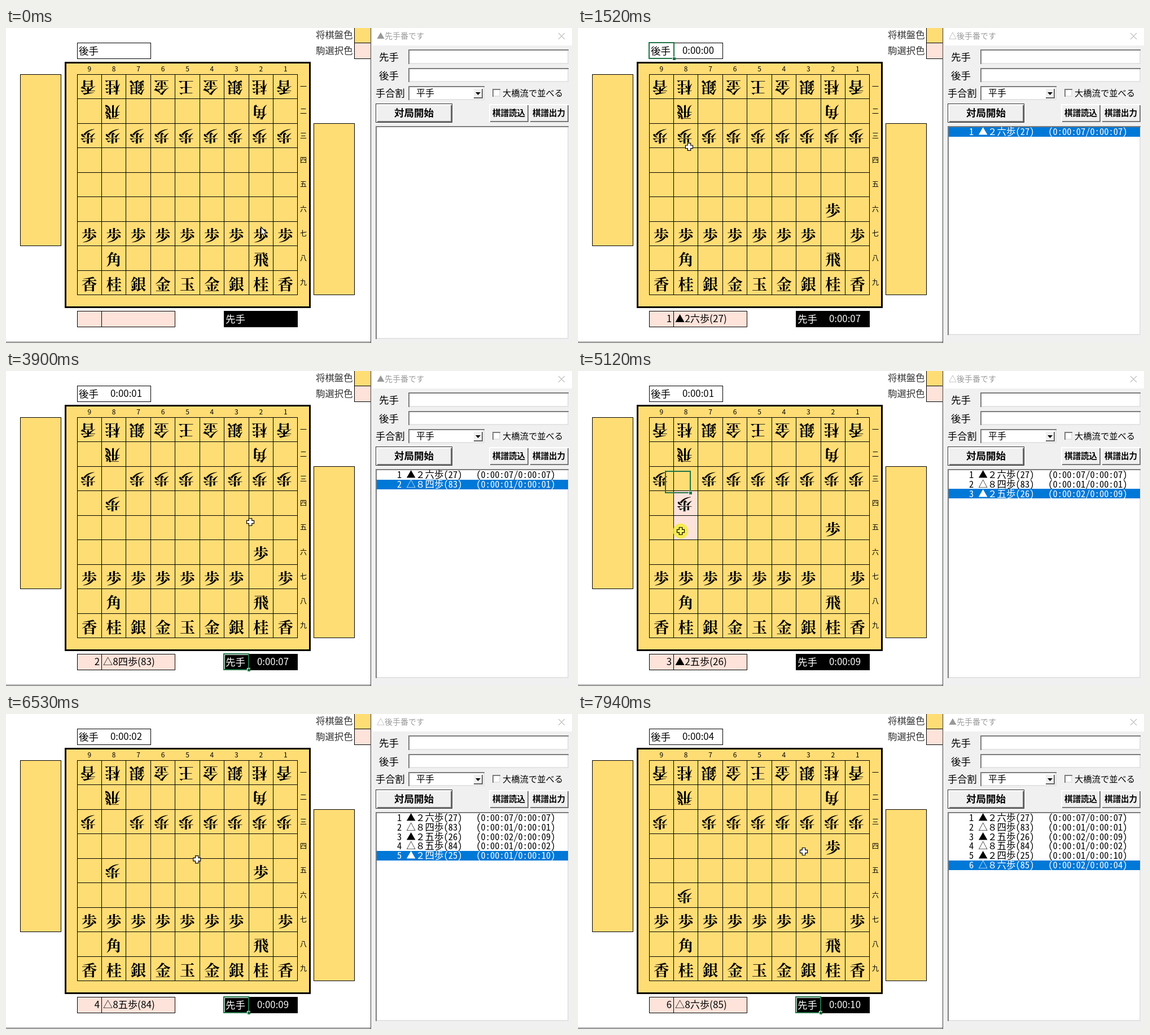
Animation, 1003 px wide and 559 px high, one loop 7.99 s. Source, as an HTML page with a canvas:

```html
<!DOCTYPE html>
<html lang="ja">
<head>
<meta charset="utf-8">
<title>将棋盤</title>
<style>
  html, body { margin: 0; width: 100%; height: 100%; overflow: hidden; background: #fff; }
  canvas { display: block; }
</style>
</head>
<body>
<canvas id="stage" width="1003" height="559"></canvas>
<script>
const ctx = document.getElementById('stage').getContext('2d');
const LOOP = 7990;
const GOLD = '#ffdd75', PINK = '#fde3da', GREEN = '#217346', BLUE = '#0078d7';
const SANS = '"Noto Sans CJK JP", "Noto Sans CJK", sans-serif';
const BRUSH = '"Noto Serif CJK JP", "Noto Sans CJK JP", "Noto Sans CJK", serif';
const MONO = '"Noto Sans Mono CJK JP", "Noto Sans CJK JP", monospace';
const RANKS = '一二三四五六七八九';
const LEFT = 126, TOP = 82.5, CELL = 43.44;
const HOMES = [[386, 502, 44, 28], [126, 26, 44, 28]];   // turn cells: first, second player

// Pawn moves: pick = click on the pawn, drop = click on its goal,
// listAt / boardAt = when the record and the sheet are refreshed.
const MOVES = [
  { file: 2, from: 7, to: 6, spent: 7, total: 7, pick: 60, drop: 500, listAt: 930, boardAt: 1040 },
  { file: 8, from: 3, to: 4, spent: 1, total: 1, pick: 1600, drop: 2290, listAt: 2480, boardAt: 2580 },
  { file: 2, from: 6, to: 5, spent: 2, total: 9, pick: 3050, drop: 3600, listAt: 4040, boardAt: 4150 },
  { file: 8, from: 4, to: 5, spent: 1, total: 2, pick: 4520, drop: 5055, listAt: 5235, boardAt: 5330 },
  { file: 2, from: 5, to: 4, spent: 1, total: 10, pick: 5600, drop: 6050, listAt: 6490, boardAt: 6600 },
  { file: 8, from: 5, to: 6, spent: 2, total: 4, pick: 6850, drop: 7360, listAt: 7540, boardAt: 7640 },
];
const SELECT = 100, STAY = 180, RETURN = 280;

// Pointer path: time, x, y
const PATH = [
  [0, 455, 362], [60, 455, 362], [250, 452, 320], [960, 452, 320], [1280, 296, 266],
  [1520, 197, 211], [1700, 190, 205], [1950, 188, 242], [2500, 188, 242],
  [2940, 435, 320], [3200, 435, 320], [3500, 433, 268], [3960, 433, 268],
  [4400, 187, 240], [4750, 187, 240], [5000, 182, 284], [5140, 182, 284],
  [5360, 400, 276], [5450, 435, 275], [5720, 435, 275], [5950, 436, 240],
  [6320, 436, 240], [6530, 339, 258], [6750, 186, 284], [7000, 186, 284],
  [7220, 184, 326], [7560, 184, 326], [7880, 351, 258], [7940, 400, 244], [LOOP, 400, 244],
];

const mix = (a, b, k) => a + (b - a) * k;
const clock = s => '0:00:' + String(s).padStart(2, '0');
const mark = i => i % 2 ? '△' : '▲';
const cellRect = (file, rank) => [LEFT + (9 - file) * CELL, TOP + (rank - 1) * CELL, CELL, CELL];

function fill(x, y, w, h, color) {
  ctx.fillStyle = color;
  ctx.fillRect(x, y, w, h);
}

function box(x, y, w, h, color, line = 1) {
  fill(x, y, w, h, color);
  ctx.strokeStyle = '#000';
  ctx.lineWidth = line;
  ctx.strokeRect(x + .5, y + .5, w, h);
}

function text(str, x, y, size, { color = '#000', align = 'left', weight = 400, font = SANS } = {}) {
  ctx.font = `${weight} ${size}px ${font}`;
  ctx.textAlign = align;
  ctx.fillStyle = color;
  ctx.fillText(str, x, y);
}

function path(points, color, width = 1) {
  ctx.strokeStyle = color;
  ctx.lineWidth = width;
  ctx.beginPath();
  points.forEach(([x, y]) => ctx.lineTo(x, y));
  ctx.stroke();
}

function bevel(x, y, w, h, color, light, dark) {
  fill(x, y, w, h, light);
  fill(x + 2, y + 2, w - 2, h - 2, dark);
  fill(x + 2, y + 2, w - 4, h - 4, color);
}
const sunken = (x, y, w, h) => bevel(x, y, w, h, '#fff', '#7c7c7c', '#e3e3e3');

function button(x, w, label, size, framed) {
  if (framed) fill(x - 1, 134, w + 2, 34, '#333');
  bevel(x, 135, w, 32, '#f0f0f0', '#fff', '#777');
  text(label, x + w / 2, 151 + size * .37, size, { align: 'center', weight: 700 });
}

function piece(char, file, rank, flipped) {
  const [x, y] = cellRect(file, rank);
  ctx.save();
  ctx.translate(x + CELL / 2 - (flipped ? 2.5 : 0), y + CELL / 2 + (flipped ? 1.5 : 2.5));
  if (flipped) ctx.rotate(Math.PI);
  text(char, 0, 10.3, 27.5, { align: 'center', weight: 600, font: BRUSH });
  ctx.restore();
}

function drawSheet(t) {
  const done = MOVES.filter(m => t >= m.boardAt);
  const last = done.length - 1;
  fill(0, 0, 647, 559, '#fff');
  text('将棋盤色', 549, 18, 16.4, { color: '#333', weight: 300 });
  text('駒選択色', 549, 46, 16.4, { color: '#333', weight: 300 });
  box(617, -2, 29, 28, GOLD);
  box(617, 26, 29, 28, PINK);

  box(25, 82, 72, 304, GOLD);
  box(545, 169, 72, 304, GOLD);
  box(105, 61, 433, 434, GOLD, 3);

  for (const m of MOVES) {
    if (t >= m.pick && t < m.drop + STAY) fill(...cellRect(m.file, m.from), PINK);
    if (t >= m.drop && t < m.drop + STAY) fill(...cellRect(m.file, m.to), PINK);
  }
  for (let i = 0; i <= 9; i++) {
    const x = Math.floor(LEFT + i * CELL) + .5, y = Math.floor(TOP + i * CELL) + .5;
    path([[x, 82], [x, 474]], '#000');
    path([[126, y], [517, y]], '#000');
  }
  for (let n = 1; n <= 9; n++) {
    const [x] = cellRect(n, n), y = TOP + (n - .5) * CELL;
    text(n, x + CELL / 2, 77, 12, { align: 'center' });
    text(RANKS[n - 1], 527, y + 4.5, 12, { align: 'center' });
  }

  const pawns = { 2: 7, 8: 3 };
  done.forEach(m => pawns[m.file] = m.to);
  for (let file = 1; file <= 9; file++) {
    const back = '香桂銀金玉金銀桂香'[file - 1];
    piece(back, file, 9, false);
    piece(back === '玉' ? '王' : back, file, 1, true);
    piece('歩', file, file === 2 ? pawns[2] : 7, false);
    piece('歩', file, file === 8 ? pawns[8] : 3, true);
  }
  piece('角', 8, 8, false);
  piece('飛', 2, 8, false);
  piece('角', 2, 2, true);
  piece('飛', 8, 2, true);

  box(126, 26, 130, 28, '#fff');
  text('後手', 129, 47, 17.5);
  box(386, 502, 130, 28, '#000');
  text('先手', 389, 523, 17.5, { color: '#fff' });
  box(126, 502, 173, 28, PINK);
  path([[169.5, 502], [169.5, 530]], '#000');
  if (last >= 0) {
    const m = done[last];
    const used = side => done.reduce((s, d, i) => i % 2 === side ? d.total : s, 0);
    text(clock(used(1)), 213, 46, 16.8, { align: 'center' });
    text(clock(used(0)), 473, 522, 16.8, { align: 'center', color: '#fff' });
    text(last + 1, 166, 522, 16.8, { align: 'right' });
    text(`${mark(last)}${m.file}${RANKS[m.to - 1]}歩(${m.file}${m.from})`, 172, 522, 17.2);
  }
  fill(0, 557, 647, 1, '#222');
}

function drawSelection(t) {
  if (t < MOVES[0].pick) return;
  const home = HOMES[MOVES.filter(m => t >= m.boardAt).length % 2];
  let rect = home;
  for (const m of MOVES) {
    for (const [start, rank] of [[m.pick, m.from], [m.drop, m.to]]) {
      const age = t - start;
      if (age < 0 || age >= RETURN) continue;
      const k = Math.min(age / SELECT, 1, (RETURN - age) / (RETURN - STAY));
      rect = home.map((v, i) => mix(v, cellRect(m.file, rank)[i], k));
    }
  }
  const [x, y, w, h] = rect.map(Math.round);
  ctx.strokeStyle = '#fff';
  ctx.lineWidth = 1;
  if (rect === HOMES[0]) ctx.strokeRect(x + 1.5, y + 1.5, w - 2, h - 2);
  ctx.strokeStyle = GREEN;
  ctx.lineWidth = 2;
  ctx.strokeRect(x, y, w, h);
  fill(x + w - 3, y + h - 3, 6, 6, '#fff');
  fill(x + w - 2, y + h - 2, 5, 5, GREEN);
}

// Half-width characters take one column, others two.
function columns(str, x, y, color) {
  const step = 8.25;
  for (const char of str) {
    const width = char.charCodeAt(0) < 128 ? step : step * 2;
    if (char !== ' ') text(char, x + width / 2, y, 16.5, { color, align: 'center', weight: 300, font: MONO });
    x += width;
  }
}

function drawPanel(t) {
  const listed = MOVES.filter(m => t >= m.listAt);
  fill(646, 0, 1, 559, '#444');
  fill(647, 0, 356, 559, '#f0f0f0');
  fill(649, 0, 354, 31, '#fff');
  const turn = listed.length % 2;
  text(`${mark(turn)}${turn ? '後' : '先'}手番です`, 657, 19, 14, { color: '#999' });
  path([[979, 9], [990, 20]], '#999');
  path([[990, 9], [979, 20]], '#999');

  text('先手', 661, 58, 17.5);
  text('後手', 661, 91, 17.5);
  text('手合割', 655, 122, 17.2);
  sunken(713, 38, 284, 26);
  sunken(713, 71, 284, 25);
  sunken(713, 103, 135, 25);
  text('平手', 727, 121, 16);
  bevel(827, 106, 18, 19, '#f0f0f0', '#fff', '#666');
  ctx.fillStyle = '#000';
  ctx.beginPath();
  ctx.moveTo(832, 114);
  ctx.lineTo(841, 114);
  ctx.lineTo(836.5, 119);
  ctx.fill();
  sunken(862, 108, 14, 14);
  text('大橋流で並べる', 880, 121, 15.3);

  button(656, 134, '対局開始', 17.5, true);
  button(856, 70, '棋譜読込', 14.5);
  button(927, 70, '棋譜出力', 14.5);

  sunken(655, 174, 342, (listed.length ? 545 : 552) - 174);
  listed.forEach((m, i) => {
    const y = 176 + i * 16.7, current = i === listed.length - 1;
    if (current) fill(657, Math.round(y), 339, 17, BLUE);
    const wide = String.fromCharCode(0xff10 + m.file);
    columns(`${String(i + 1).padStart(5)} ${mark(i)}${wide}${RANKS[m.to - 1]}歩(${m.file}${m.from})   (${clock(m.spent)}/${clock(m.total)})`,
      660, y + 14.2, current ? '#fff' : '#000');
  });
}

function outline(points, color) {
  ctx.beginPath();
  points.forEach(([x, y]) => ctx.lineTo(x, y));
  ctx.closePath();
  ctx.fillStyle = color;
  ctx.fill();
  ctx.strokeStyle = '#000';
  ctx.lineWidth = 1.2;
  ctx.stroke();
}

function drawPointer(t) {
  const i = PATH.findIndex(p => p[0] > t);
  const a = PATH[i - 1], b = PATH[i], k = (t - a[0]) / (b[0] - a[0]);
  ctx.save();
  ctx.translate(mix(a[1], b[1], k), mix(a[2], b[2], k));
  if (t < MOVES[0].pick) {
    outline([[-3, -9], [-3, 6], [0, 3], [3, 9], [5, 8], [3, 2], [7, 2]], '#fff');
  } else {
    const pressed = MOVES.some(m => [m.pick, m.drop].some(s => t >= s && t < s + 120));
    if (pressed) {
      ctx.fillStyle = 'rgba(244, 238, 50, .82)';
      ctx.beginPath();
      ctx.arc(0, 0, 13.5, 0, 7);
      ctx.fill();
    }
    const arm = 6.5, half = 2.7;
    outline([[-half, -arm], [half, -arm], [half, -half], [arm, -half], [arm, half], [half, half],
      [half, arm], [-half, arm], [-half, half], [-arm, half], [-arm, -half], [-half, -half]],
      pressed ? '#fbf56a' : '#fff');
  }
  ctx.restore();
}

const began = performance.now();
function frame() {
  const t = (performance.now() - began) % LOOP;
  drawSheet(t);
  drawSelection(t);
  drawPanel(t);
  drawPointer(t);
  requestAnimationFrame(frame);
}
frame();
</script>
</body>
</html>
```
